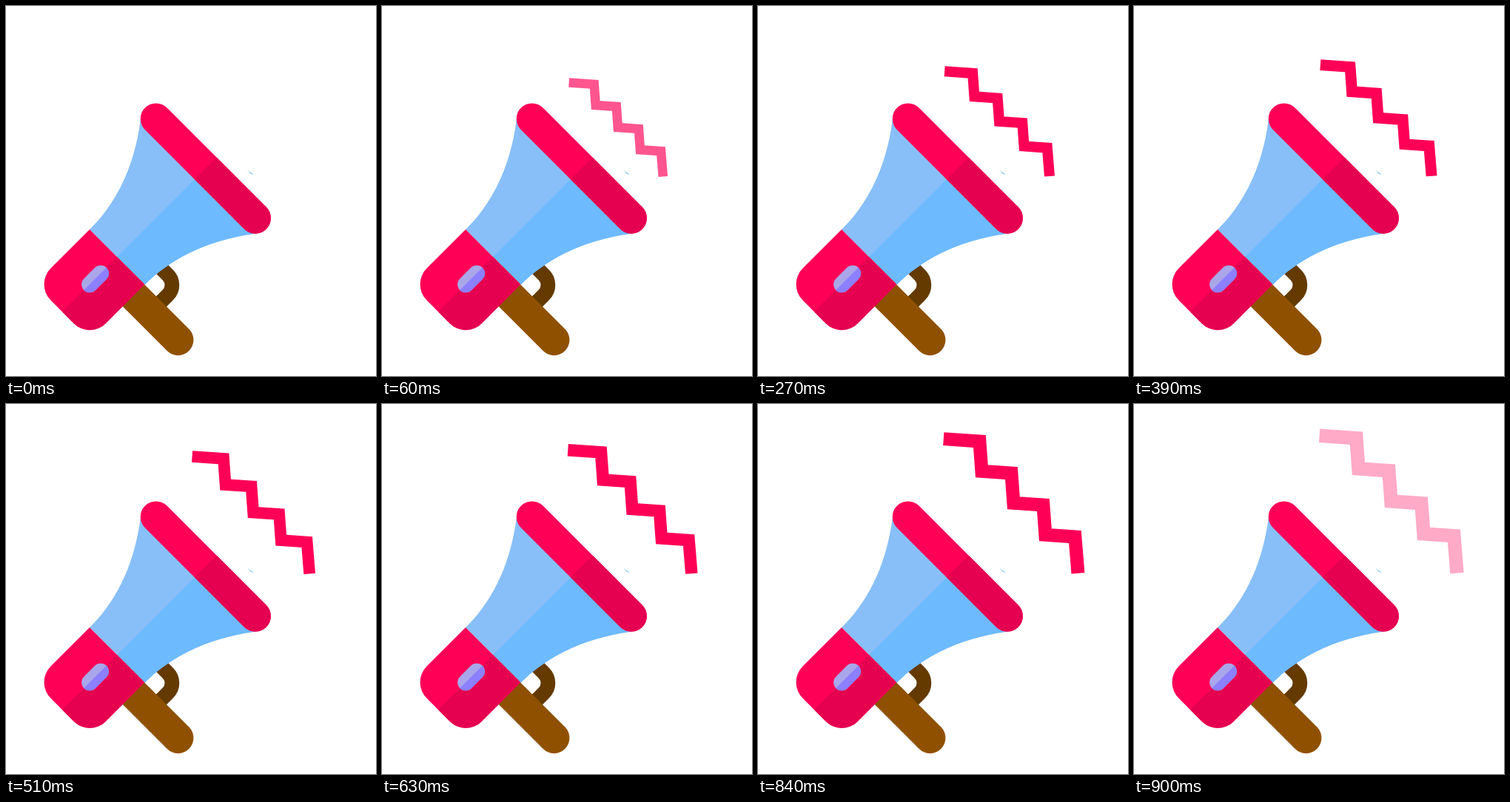
An HTML page with a canvas for the animation above (0.93 s loop, 500 by 500 pixels).

```html
<!DOCTYPE html>
<html lang="en">
<head>
<meta charset="utf-8">
<title>Megaphone</title>
<style>
  html, body { margin: 0; width: 100%; height: 100%; overflow: hidden; background: #fff; }
  canvas { display: block; width: 500px; height: 500px; }
</style>
</head>
<body>
<canvas id="stage" width="500" height="500"></canvas>
<script>
const ctx = document.getElementById('stage').getContext('2d');
const LOOP = 930, STEP = 30;
const AXIS = 489.3; // the megaphone is symmetric about x + y = AXIS
const PINK = '#ff0057', DARK_PINK = '#e50050';

function strokePath(path, color, width) {
  ctx.strokeStyle = color;
  ctx.lineWidth = width;
  ctx.stroke(path);
}

function fillPath(path, color) {
  ctx.fillStyle = color;
  ctx.fill(path);
}

// Fills the shape, then shades the half to the right of the axis.
function fillHalves(path, light, dark) {
  fillPath(path, light);
  ctx.save();
  ctx.beginPath();
  ctx.moveTo(AXIS, 0);
  ctx.lineTo(500, 500);
  ctx.lineTo(0, AXIS);
  ctx.clip();
  fillPath(path, dark);
  ctx.restore();
}

function capsule(x1, y1, x2, y2, r) {
  const path = new Path2D();
  const turn = Math.atan2(y2 - y1, x2 - x1);
  path.arc(x1, y1, r, turn + Math.PI / 2, turn + Math.PI * 1.5);
  path.arc(x2, y2, r, turn - Math.PI / 2, turn + Math.PI / 2);
  path.closePath();
  return path;
}

const loop = new Path2D('M200 344.7L218.7 363.4A19.2 19.2 0 0 1 218.7 390.6L198 411.3');
const grip = capsule(150, 368.8, 232.5, 451.3, 20.9);
const horn = new Path2D('M182 152C173 225 143 273 113 302L187.6 376.6' +
  'C216.8 347 264.8 317.2 337.3 307.5Z');
const bar = capsule(202.7, 152.4, 336.9, 286.6, 21);
const button = capsule(113.1, 376.2, 127.9, 361.4, 11);
const speck = new Path2D('M326 220Q328.5 225.5 335 227.5Q329 227.8 326 220Z');

const body = new Path2D();
body.moveTo(113, 302);
body.arcTo(38.9, 376.1, 113.2, 450.4, 30.4);
body.arcTo(113.2, 450.4, 187.3, 376.3, 30.4);
body.lineTo(187.3, 376.3);
body.closePath();

const zigzag = new Path2D();
zigzag.moveTo(250.6, 42.8);
for (let i = 0; i < 4; i++) {
  const d = 44 * i;
  zigzag.lineTo(300.4 + d, 46.2 + d);
  if (i < 3) zigzag.lineTo(303.4 + d, 87.4 + d);
}
zigzag.lineTo(436.5, 228.5);

function drawMegaphone() {
  strokePath(loop, '#643a00', 19.8);
  fillPath(grip, '#8f5100');
  fillHalves(horn, '#88bff8', '#6dbaff');
  fillHalves(body, PINK, DARK_PINK);
  fillHalves(bar, PINK, DARK_PINK);
  fillHalves(button, '#aaa6ea', '#8c80ff');
  fillPath(speck, '#2aabd2');
}

// The sound wave grows steadily and fades over three steps at both ends.
function drawWave(time) {
  const scale = 0.718 + (time - 150) * 0.000376;
  ctx.save();
  ctx.globalAlpha = Math.min(1, time / 90, (LOOP - time) / 90);
  ctx.translate(257, 235);
  ctx.scale(scale, scale);
  ctx.translate(-257, -235);
  strokePath(zigzag, PINK, 18.4);
  ctx.restore();
}

function render() {
  const time = Math.floor(performance.now() % LOOP / STEP) * STEP;
  ctx.fillStyle = '#fff';
  ctx.fillRect(0, 0, 500, 500);
  drawMegaphone();
  drawWave(time);
  requestAnimationFrame(render);
}
render();
</script>
</body>
</html>
```
